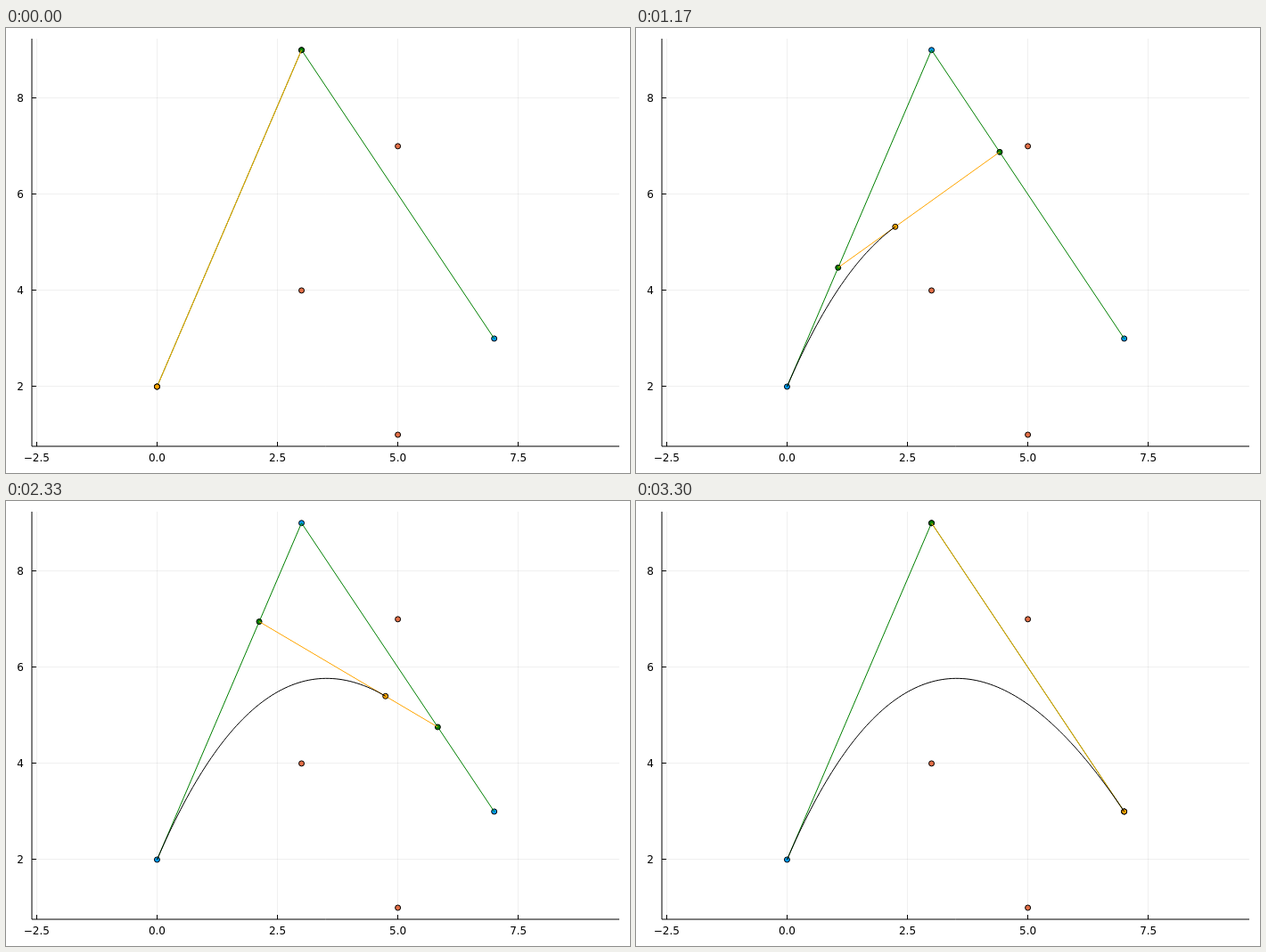
Animation, 700 px wide and 500 px high, one loop 3.33 s. Source, as an HTML page with a canvas:

```html
<!DOCTYPE html>
<html lang="en">
<head>
<meta charset="utf-8">
<title>Quadratic Bézier construction</title>
<style>
  html, body { margin: 0; overflow: hidden; background: #fff; }
  canvas { display: block; }
</style>
</head>
<body>
<canvas id="stage" width="700" height="500"></canvas>
<script>
const ctx = document.getElementById('stage').getContext('2d');
const LOOP = 3330, LAST = 99;
const BOX = { left: 29, right: 688, top: 12, bottom: 470 };
const CONTROL = [[0, 2], [3, 9], [7, 3]];
const EXTRA = [[3, 4], [5, 7], [5, 1]];

const px = x => 169.45 + 54.03 * x;
const py = y => 511.03 - 54.03 * y;
const lerp = (a, b, t) => a.map((v, i) => v + (b[i] - v) * t);

function stroke(points, color, width = 1) {
  ctx.beginPath();
  for (const [x, y] of points) ctx.lineTo(x, y);
  ctx.strokeStyle = color;
  ctx.lineWidth = width;
  ctx.stroke();
}

const plot = (points, color) =>
  stroke(points.map(([x, y]) => [px(x), py(y)]), color);

function scatter(points, color) {
  ctx.fillStyle = color;
  ctx.strokeStyle = '#000';
  ctx.lineWidth = 1;
  for (const [x, y] of points) {
    ctx.beginPath();
    ctx.arc(px(x), py(y), 3, 0, 2 * Math.PI);
    ctx.fill();
    ctx.stroke();
  }
}

function drawAxes() {
  const { left, right, top, bottom } = BOX;
  const grid = 'rgba(0,0,0,.06)';
  ctx.font = '12px "DejaVu Sans", sans-serif';
  ctx.fillStyle = '#000';

  ctx.textAlign = 'center';
  for (const v of [-2.5, 0, 2.5, 5, 7.5]) {
    const x = Math.floor(px(v)) + .5;
    stroke([[x, top], [x, bottom]], grid);
    stroke([[x, bottom], [x, bottom - 5]], '#000');
    ctx.fillText(v.toFixed(1).replace('-', '\u2212'), px(v), 486.5);
  }

  ctx.textAlign = 'right';
  for (const v of [2, 4, 6, 8]) {
    const y = Math.floor(py(v)) + .5;
    stroke([[left, y], [right, y]], grid);
    stroke([[left, y], [left + 5, y]], '#000');
    ctx.fillText(v, 20, py(v) + 4.4);
  }

  stroke([[left, top], [left, bottom], [right, bottom]], '#000');
}

function construct(t) {
  const [a, b, c] = CONTROL;
  const ends = [lerp(a, b, t), lerp(b, c, t)];
  return { ends, tip: lerp(...ends, t) };
}

function draw(step) {
  const { ends, tip } = construct(step / LAST);
  const curve = Array.from({ length: step + 1 }, (_, i) => construct(i / LAST).tip);

  ctx.fillStyle = '#fff';
  ctx.fillRect(0, 0, 700, 500);
  drawAxes();
  scatter(CONTROL, '#009afa');
  scatter(EXTRA, '#e36f47');
  plot(CONTROL, '#008000');
  scatter(ends, '#008000');
  plot(ends, '#ffa500');
  scatter([tip], '#ffa500');
  plot(curve, '#000');
}

// 30 steps per second, with step times rounded to 10 ms
function tick(now) {
  draw(Math.min(LAST, Math.floor((now % LOOP * 3 + 10.5) / 100)));
  requestAnimationFrame(tick);
}

draw(0);
requestAnimationFrame(tick);
</script>
</body>
</html>
```
